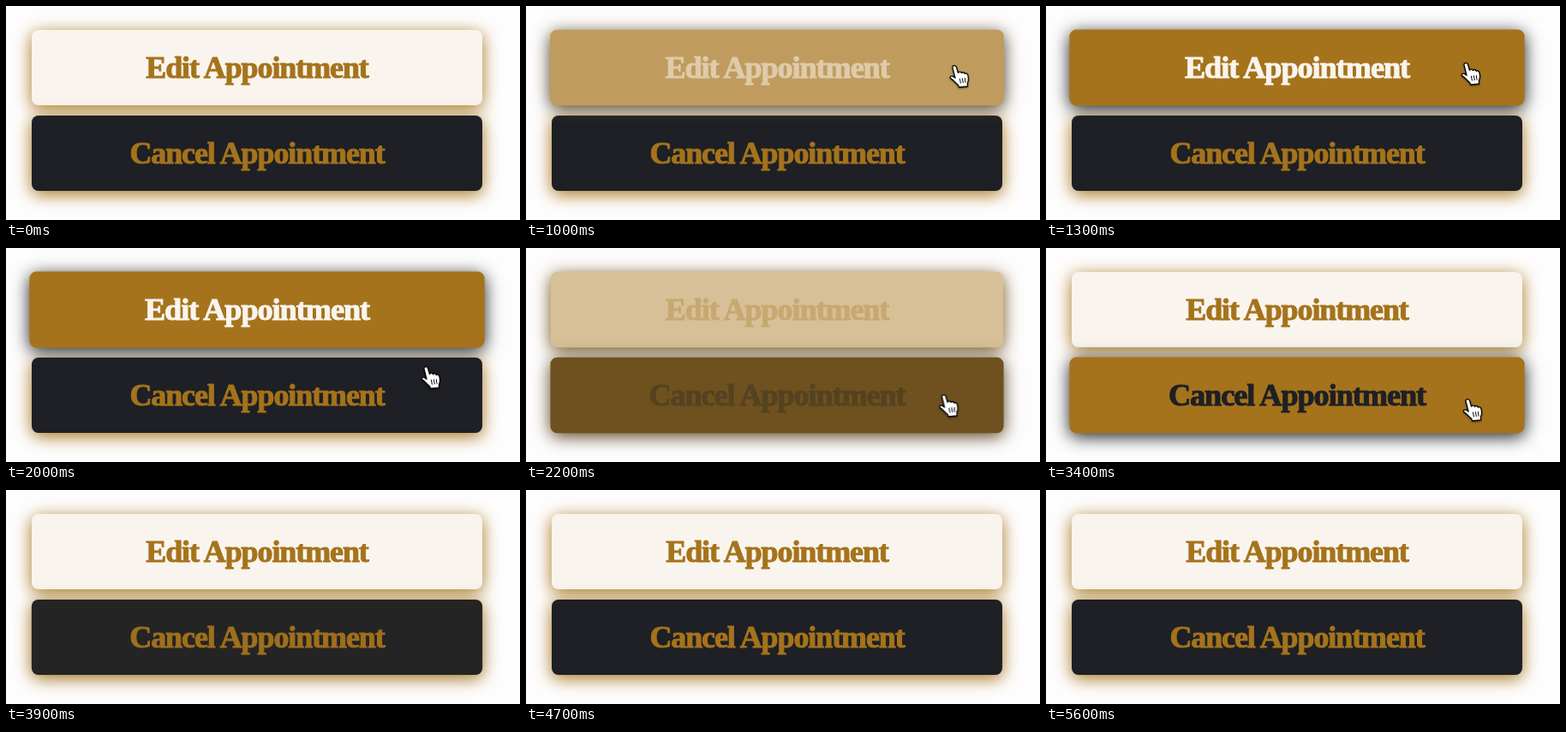
Animation, 600 px wide and 250 px high, one loop 5.7 s. Source, as an HTML page:

```html
<!DOCTYPE html>
<html lang="en">
<head>
<meta charset="utf-8">
<title>Appointment buttons</title>
<style>
  :root {
    --gold: #a5731b;
    --cream: #f9f4ee;
    --ink: #1e2025;
    --loop: 5700ms;
    --glow: 0 4px 20px var(--gold);
    --shade: 0 4px 20px var(--ink);
  }
  html, body {
    margin: 0;
    width: 100%;
    height: 100%;
    overflow: hidden;
    background: #fefdfd;
  }
  .stage {
    position: relative;
    width: 600px;
    height: 250px;
    overflow: hidden;
  }
  .btn {
    position: absolute;
    left: 30px;
    width: 526px;
    height: 88px;
    border-radius: 8px;
    box-shadow: var(--glow);
    color: var(--gold);
    font: bold 36px/88px "Liberation Serif", "Times New Roman", serif;
    letter-spacing: -1.1px;
    text-align: center;
    white-space: nowrap;
    -webkit-text-stroke: 1px;
  }
  .edit {
    top: 27.5px;
    background: var(--cream);
    animation: edit var(--loop) infinite, raise var(--loop) step-end infinite;
  }
  .cancel {
    top: 128px;
    background: var(--ink);
    animation: cancel var(--loop) infinite;
  }
  .hand {
    position: absolute;
    left: 0;
    top: 0;
    z-index: 2;
    overflow: visible;
    filter: drop-shadow(0 1px 1px #0006);
    animation: move var(--loop) ease-in-out infinite;
  }

  /* Each hover change is a 500 ms ease */
  @keyframes edit {
    0%, 14.04%, 44.39%, 100% {
      background: var(--cream);
      color: var(--gold);
      box-shadow: var(--glow);
      transform: scale(1);
    }
    22.81%, 35.61% {
      background: var(--gold);
      color: var(--cream);
      box-shadow: var(--shade);
      transform: scale(1.01);
    }
  }
  @keyframes cancel {
    0%, 35.61%, 70.88%, 100% {
      background: var(--ink);
      color: var(--gold);
      box-shadow: var(--glow);
      transform: scale(1);
    }
    44.39%, 62.11% {
      background: var(--gold);
      color: var(--ink);
      box-shadow: var(--shade);
      transform: scale(1.01);
    }
  }
  @keyframes raise {
    0%, 35.61%, 100% { z-index: 0; }
    14.04% { z-index: 1; }
  }
  @keyframes move {
    0%, 12.3% { transform: translate(612px, 100px); animation-timing-function: linear; }
    14.04% { transform: translate(558px, 84px); animation-timing-function: linear; }
    17.54% { transform: translate(500px, 70px); animation-timing-function: ease-out; }
    20.18%, 31.93% { transform: translate(490px, 67px); }
    35.09% { transform: translate(490px, 139px); animation-timing-function: ease-out; }
    40.35%, 54.39% { transform: translate(487px, 178px); }
    57.89%, 59.65% { transform: translate(492px, 177px); animation-timing-function: ease-in; }
    62.11% { transform: translate(562px, 182px); animation-timing-function: linear; }
    63.86%, 100% { transform: translate(612px, 188px); }
  }
</style>
</head>
<body>
<div class="stage">
  <div class="btn edit">Edit Appointment</div>
  <div class="btn cancel">Cancel Appointment</div>
  <svg class="hand" width="1" height="1" stroke="#000" stroke-linecap="round" stroke-linejoin="round">
    <path fill="#fff" stroke-width="1.3" d="M-2 2C-2.6-.6 1.6-1.4 2.4 1L4.6 8.2C5 6.6 8 6.4 8.6 8.4C9.4 6.9 12 7.2 12.4 9.2C13.4 8 15.6 8.8 15.9 10.8C17 15 16.6 18 15.4 20L15.6 24L5.6 25L4.6 22.4C2 20.6-1 16.5-4.4 14.4C-5.6 12.6-3 11-1 12.4L1 14Z"/>
    <path fill="none" stroke-width="1" d="M6.4 15l1 5M9.4 14.6l.9 5M12.4 14.4l.6 4.8"/>
  </svg>
</div>
</body>
</html>
```
